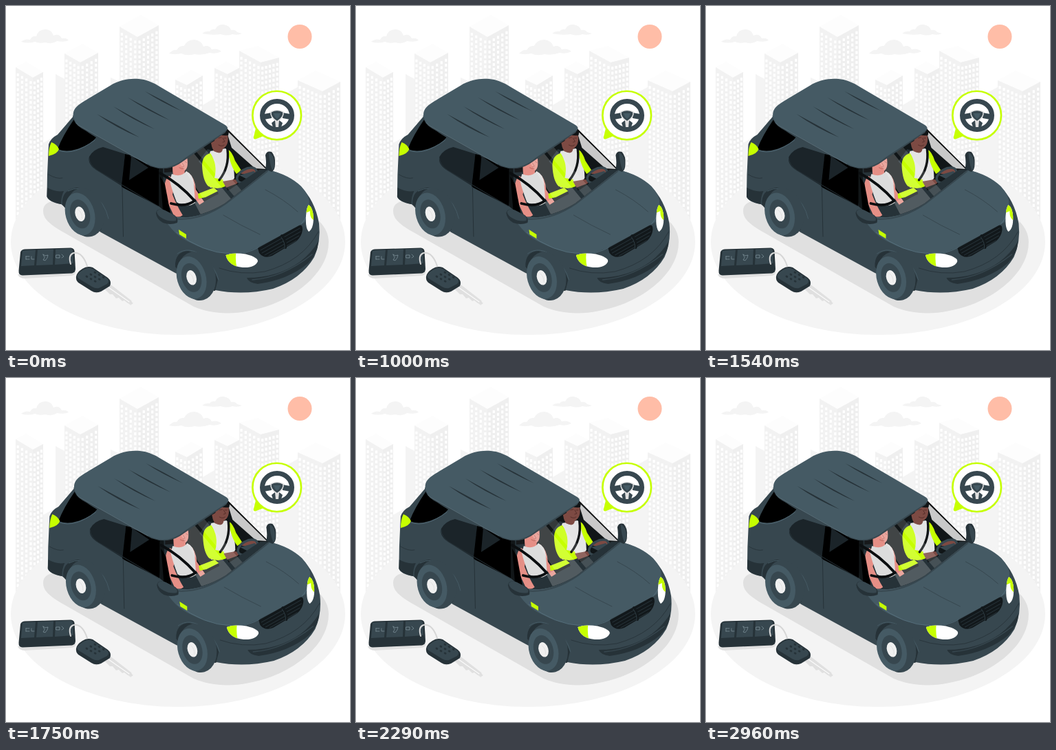
Write an HTML page that moves like this. It is 500 by 500 pixels and loops after 3 s.

```html
<!DOCTYPE html>
<html lang="en">
<head>
<meta charset="utf-8">
<title>Family car</title>
<style>
html, body { margin: 0; width: 100%; height: 100%; overflow: hidden; background: #fff }
svg { display: block; width: 100vw; height: 100vh }
.line { fill: none; stroke-linecap: round; stroke-linejoin: round }
.ink { fill: #263238 } .body { fill: #37474f } .top { fill: #455a64 }
.lime { fill: #c6ff00 } .skin { fill: #e58f86 } .brown { fill: #7d4a43 }
</style>
</head>
<body>
<svg viewBox="0 0 500 500">
  <defs>
    <g id="wheel">
      <ellipse class="body" cx="5" cy="0" rx="27" ry="36" transform="rotate(-16)"/>
      <ellipse class="top" cx="-3" rx="21" ry="31.5" transform="rotate(-16)"/>
      <ellipse class="body" cx="-3" rx="14" ry="21.5" transform="rotate(-16)"/>
      <ellipse cx="-3" rx="7" ry="11" fill="#f0f0f0" transform="rotate(-16)"/>
      <path class="line" d="M-5-5Q1 0 0 7" stroke="#e0e0e0"/>
    </g>
    <clipPath id="cabin"><path d="M222 234Q244 236 262 221L321 178L380 238Q350 262 318 287Q280 310 242 307L222 291Z"/></clipPath>
    <clipPath id="lampL"><path d="M319.500 362Q331 358 348 360.500Q366 365 366 371Q362 381 344 380Q323 378 319.500 362Z"/></clipPath>
    <clipPath id="lampR"><path d="M440 289Q446 293 447 307Q447 324 440 328Q435 323 436 305Q437 292 440 289Z"/></clipPath>
  </defs>

  <g id="city"></g>
  <g fill="#f4f4f4">
    <path d="M22 52Q28 47 35 49Q38 43 44 44Q47 34 57 34Q66 34 69 43Q77 39 81 47Q88 46 91 50Q85 53 74 51Q67 56 57 53Q48 55 42 52Q32 55 22 52Z"/>
    <path d="M237 69Q243 63 248 64Q252 57 259 58Q263 49 274 49Q284 50 287 59Q295 56 299 63Q308 61 313 66Q306 70 296 68Q285 72 274 70Q262 73 255 69Q245 71 237 69Z"/>
    <path d="M285 40Q290 36 296 37Q299 33 304 34Q308 26 316 27Q325 28 327 35Q333 34 336 38L343 40Q337 43 329 41Q321 44 312 41Q300 43 285 40Z"/>
  </g>
  <circle cx="427" cy="44.5" r="17.5" fill="#ffbda7"/>
  <ellipse cx="250" cy="343" rx="243" ry="135" fill="#f4f4f4"/>
  <path fill="#e0e0e0" d="M54 298C54 288 62 282 80 284L420 290C448 302 469 320 469 343C469 384 428 418 386 434C342 450 304 450 273 437L82 328C63 317 54 309 54 298Z"/>

  <g id="car">
    <!-- shell -->
    <path class="body" d="M99 159L75 187Q65 192 62 201L60 245L59.500 277Q62 285 80 288L138 329L246 388L304 413Q345 421 388 411Q429 397 448 365Q458 343 455 316Q449 282 427 261Q408 245 381 238L320 178L205 190Z"/>
    <path class="ink" d="M60 264Q72 271 84 269Q80 277 80 288Q62 284 59.500 277Z"/>
    <path class="line" d="M62 245Q74 252 82 250" stroke="#263238" stroke-width=".8"/>
    <path class="ink" d="M82 289Q80 267 103 264Q133 268 142 304L138 326L112 324ZM246 379Q245 357 265 356Q297 366 308 398L304 414L272 412Z"/>
    <path class="line" d="M90 269Q106 260 125 272Q144 286 149 309M249 360Q266 348 287 364Q304 379 309 398" stroke="#455a64"/>
    <use href="#wheel" x="110.500" y="301.500"/>
    <use href="#wheel" x="272.500" y="394"/>

    <!-- side glass -->
    <path d="M100 163Q105 176 131 191Q125 200 105 207.500Q88 213 75 208Q82 189 100 163Z"/>
    <path class="lime" d="M66 198Q74 201 77 208Q75 215 62 218Q62 206 66 198Z"/>
    <path class="line" d="M77 210Q98 218 129 195" stroke="#607d8b" stroke-width=".6"/>
    <path d="M121 219Q127 208 141 205L173 215L169 262L134 240Q118 231 121 219Z" fill="#1b2429"/>
    <path d="M174 216L226 235L222 291L168 263Z"/>
    <path d="M182 218L207 235L179 253Z" fill="#1b2429"/>
    <path d="M173 215L181 217L178 255L168 262Z"/>
    <path class="line" d="M169 263L170.500 335M121 221Q121 231 133 239L221 291" stroke="#263238"/>

    <!-- cabin -->
    <path d="M222 234Q244 236 262 221L321 178L380 238Q350 262 318 287Q280 310 242 307L222 291Z" fill="#111618"/>
    <path d="M320 180L378 237L362 236L328 206Z" fill="#c9c9c9"/>
    <g clip-path="url(#cabin)">
      <path class="ink" d="M228 232Q241 228 247 243L266 270L288 288L310 278L303 250L280 226L293 208L308 213L325 280L285 309L230 303Z"/>
      <!-- passenger -->
      <path d="M230 231Q240 212 262 217L265 223L245 241L230 242Z" fill="#17191b"/>
      <path class="skin" d="M243 220Q252 213 263 219Q266 235 260 239L259 248L243 247Q241 232 243 220Z"/>
      <path class="line" d="M256 228L259 233L256 234M249 226L252 225M260 226L263 228M252 235Q256 238 259 236" stroke="#a9564f" stroke-width=".7"/>
      <path class="skin" d="M237 247Q228 254 231 277L245 307L258 306Q248 290 242 274L247 254ZM265 242Q275 250 276 267L289 286L282 290L267 269Z"/>
      <path d="M241 244Q254 250 262 240Q272 245 273 258L275 286Q263 295 248 285Q241 267 238 254Z" fill="#dcdcdc"/>
      <path class="line" d="M224 243Q252 258 274 283Q262 293 240 287" stroke="#0b0e10" stroke-width="3.800"/>
      <path d="M224 248L231 259L239 301L228 296Z"/>
      <!-- driver -->
      <path class="lime" d="M279 273L302 264L308 269L290 278L280 280Z"/>
      <path d="M297 211L319 207Q331 216 332 250L325 260L297 264Q287 240 297 211Z" fill="#e4e4e4"/>
      <path class="brown" d="M299 186Q311 178 322 187Q325 202 315 208Q314 217 302 211Q295 198 299 186Z"/>
      <path d="M298 199Q293 186 302 181Q314 174 324 183L323 188Q311 189 306 185Q304 190 303 196Z" fill="#111416"/>
      <path class="line" d="M309 192L313 191M317 192L320 192M315 192L318 197L315 198M309 202Q314 205 317 202" stroke="#4e2925" stroke-width=".8"/>
      <path class="lime" d="M297 214Q285 217 285 232Q286 254 294 262Q307 268 319 262L315 252L303 250Q308 230 297 214ZM322 208Q329 212 333 225L342 239L335 244Q326 233 322 208Z"/>
      <path class="brown" d="M315 255L332 252Q339 253 336 258L320 264ZM340 239L354 234Q364 235 366 240L360 244L342 244Z"/>
      <path class="line" d="M322 209Q325 234 310 253" stroke="#111416" stroke-width="3.5"/>
      <ellipse class="line" cx="350" cy="246" rx="15.5" ry="9" transform="rotate(-30 350 246)" stroke="#37474f" stroke-width="3.5"/>
      <path class="body" d="M339 246L360 240L364 244L349 251Z"/>
      <!-- dashboard and reflections -->
      <path class="ink" d="M281 289Q307 272 325 267L368 238L381 238L318 290L283 309L252 307Z"/>
      <path d="M253 229L272 213L331 285L286 309L274 286L286 279Z" fill="#fff" opacity=".2"/>
      <path d="M276 211L286 204L345 271L333 278Z" fill="#fff" opacity=".15"/>
    </g>
    <path class="line" d="M321 179L380 238" stroke="#111" stroke-width="1.3"/>

    <!-- roof -->
    <path class="body" d="M97 159Q98 171 110 178L210 233Q232 241 251 230L319 184L322 178L205 210Z"/>
    <path class="top" d="M98 162C96 149 104 144 119 135L151 116C165 107 180 105 193 106Q208 107 224 117.500L317 172Q326 177 319 182L260 221C243 236 224 239 207 230L111 176Q100 171 98 162Z"/>
    <path class="line" d="M102 170Q105 174 112 177L205 229.500" stroke="#78909c" stroke-width=".5"/>
    <g class="ink">
      <path d="M202 124Q230 138 256 153Q226 140 202 124Z"/>
      <path d="M177 133Q207 149 238 166Q205 152 177 133Z"/>
      <path d="M156 146Q185 162 216 179Q183 165 156 146Z"/>
      <path d="M132 157Q162 173 194 191Q160 177 132 157Z"/>
    </g>

    <!-- bonnet and nose -->
    <path class="top" d="M224 297Q242 309 268 307Q296 304 321 286L381 238Q411 245 429 262Q442 276 441 289Q435 297 435 314L428 318L368 350Q347 361 322 360Q292 357 264 342Q238 329 224 297Z"/>
    <path class="line" d="M242 309Q281 314 320 287L380 240" stroke="#37474f" stroke-width="2"/>
    <path class="line" d="M316 304Q341 319 369 332M377 267Q404 281 424 299" stroke="#37474f"/>
    <path class="line" d="M248 329Q286 359 326 360Q350 361 367 351M429 317Q439 307 440 292" stroke="#607d8b" stroke-width=".6"/>
    <g clip-path="url(#lampL)"><path fill="#fff" d="M315 350h60v40h-60z"/><path class="lime" d="M315 350H336Q331 368 338 390H315Z"/></g>
    <g clip-path="url(#lampR)"><path fill="#fff" d="M430 285h20v50h-20z"/><path class="lime" d="M430 285H450V313Q441 309 442 298L430 303Z"/></g>
    <path d="M366 352L426 319Q431 317 431 325Q430 335 422 342L387 363Q375 368 368 359Z" fill="#12181b"/>
    <path class="line" d="M370 355L427 323M372 359L428 328M376 362L426 334M382 363L422 341" stroke="#37474f" stroke-width=".6"/>
    <path class="line" d="M401 334Q407 342 406 351" stroke="#12181b" stroke-width="4"/>
    <path class="line" d="M400 336Q406 344 405 352" stroke="#37474f" stroke-width=".8"/>
    <path class="ink" d="M350 395Q395 395 427 372Q445 358 454 342Q453 360 439 374Q410 398 366 404Q352 402 350 395Z"/>
    <path class="line" d="M310 381Q342 392 376 386Q431 371 454 328" stroke="#263238" stroke-width=".8"/>
    <path class="line" d="M358 398Q402 395 445 361" stroke="#37474f" stroke-width="1.5"/>
    <path class="lime" d="M251 325L262 332V338L252 332Z"/>

    <!-- mirrors -->
    <path class="ink" d="M218 301Q219 294 229 296L245 304Q251 309 249 315Q239 319 228 315Q219 310 218 301Z"/>
    <path class="body" d="M219 299Q222 293 231 297L244 304Q249 308 247 312Q237 314 228 309Q220 305 219 299Z"/>
    <path class="ink" d="M377 217Q379 210 386 212Q392 218 391 230Q391 239 386 241L377 237Q379 228 377 217Z"/>
    <path class="body" d="M382 213Q390 216 390 230Q390 237 387 239Q382 225 382 213Z"/>
  </g>

  <!-- speech bubble -->
  <path class="lime" d="M363 178L360 190Q359 195 364 193L377 188Z"/>
  <circle cx="393.7" cy="159" r="35.3" fill="#fff" stroke="#c6ff00" stroke-width="2.6"/>
  <ellipse class="line" cx="394" cy="159" rx="21.5" ry="20.5" stroke="#37474f" stroke-width="7"/>
  <path class="body" d="M375 157L386 155V163L375 165ZM413 157L402 155V163L413 165ZM386 170L391 166H397L402 170L399 179H389Z"/>
  <path d="M391 166H397L396 176H392Z" fill="#e0e0e0"/>
  <path class="body" d="M385 154Q394 149 403 154Q404 162 394 168Q384 162 385 154Z" stroke="#e0e0e0" stroke-width="1.5"/>
  <path class="top" d="M389 156H399L397 161L394 164L391 161Z"/>

  <!-- key fob -->
  <path d="M17 390Q19 396 28 396L95 392Q102 391 101 385Z" fill="#e0e0e0"/>
  <path class="ink" d="M21 358Q22 354 27 353.500L94 351.500Q99 352 99.500 356L101 382Q101 387 96 388.500L24 391.500Q18 391 18.500 385Z"/>
  <path class="body" d="M24 355.500L43 354.500L41 377L22 378ZM46 354.500L69 353.500L68 376L44 377ZM72 353.500L94 352.500Q97 353 97 356L98 374L71 376Z"/>
  <path class="line" d="M29 364H34M29 368H34M29 364V368M37 364V368H41M54 361L57 363L61 362L60 366L57 370L54 369L56 366ZM73 362H78V366H73ZM81 361L84 364L81 366" stroke="#90a4ae" stroke-width=".6"/>
  <path class="line" d="M94 375Q90 362 98 359Q111 357 118 378" stroke="#d6d6d6" stroke-width="2"/>

  <!-- key -->
  <path d="M102 399L131 418L152 409L181 435L185 432L148 403Z" fill="#e4e4e4"/>
  <path d="M141 409L151 404L182 428L184 433L177 432L172 428L169 429L164 424L160 425L155 419L151 419Z" fill="#e0e0e0"/>
  <path class="line" d="M149 409L179 430" stroke="#fafafa" stroke-width="1.300"/>
  <g transform="translate(0 2)">
    <path class="ink" d="M102 391Q103 385 111 380Q118 375 126 378L148 393Q154 398 151 405L138 413Q130 416 124 412L105 400Q101 396 102 391Z"/>
    <path class="body" d="M104 389Q107 384 113 381Q119 377 126 380L147 394Q151 398 147 402L135 408Q130 409 125 406L107 395Q102 392 104 389Z"/>
    <path class="line" d="M117 391L133 400M123 388L139 397M129 385L143 393" stroke="#263238" stroke-width="2.800" stroke-dasharray="1 6"/>
  </g>
</svg>
<script>
const DURATION = 3000, LEAD = 2520, REST = 0.8;
const SHAKE = [0, -1, 2, -4, 4, -4, 4, -4, 2, -1, 0];

// left x, y; front corner x, y; right x, y; floor y
const towers = [
  [165, 30, 191, 45, 222, 28, 190], [85, 69, 108, 82, 134, 68, 225],
  [339, 65, 370, 82, 397, 75, 260], [303, 90, 322, 99, 339, 90, 230],
  [246, 107, 263, 115, 286, 101, 230], [14, 89, 39, 104, 54, 96, 310],
  [424, 108, 460, 124, 486, 110, 315]
];
const blocks = [[72, 99, 85, 106, 230], [152, 104, 165, 110, 200], [286, 144, 303, 134, 230],
  [54, 199, 74, 188, 285], [397, 132, 424, 118, 270]];

const poly = (points, fill) => `<polygon points="${points}" fill="${fill}"/>`;

function face(x1, y1, x2, y2, floor, fill) {
  let out = poly([x1, y1, x2, y2, x2, floor, x1, floor], fill);
  const count = Math.max(2, Math.round((x2 - x1) / 6));
  for (let i = 0; i < count; i++) {
    const k = (i + 0.5) / count, x = x1 + k * (x2 - x1), y = y1 + k * (y2 - y1) + 7;
    out += `<path d="M${x} ${y}V${floor}" stroke="#fff" stroke-width="3.2" stroke-dasharray="4.2 3"/>`;
  }
  return out;
}

document.getElementById('city').innerHTML =
  blocks.map(([a, b, c, d, floor]) => poly([a, b, c, d, c, floor, a, floor], '#f4f4f4')).join('') +
  towers.map(([a, b, c, d, e, f, floor]) =>
    poly([a, b, a + e - c, b + f - d, e, f, c, d], '#fdfdfd') +
    face(a, b, c, d, floor, '#f2f2f2') + face(c, d, e, f, floor, '#efefef')).join('');

const car = document.getElementById('car');
function frame(now) {
  const p = (now + LEAD) % DURATION / DURATION * 10, i = Math.floor(p);
  const x = SHAKE[i] + (SHAKE[i + 1] - SHAKE[i]) * (p - i);
  car.setAttribute('transform', `translate(${x - REST} 0)`);
  requestAnimationFrame(frame);
}
frame(0);
</script>
</body>
</html>
```
